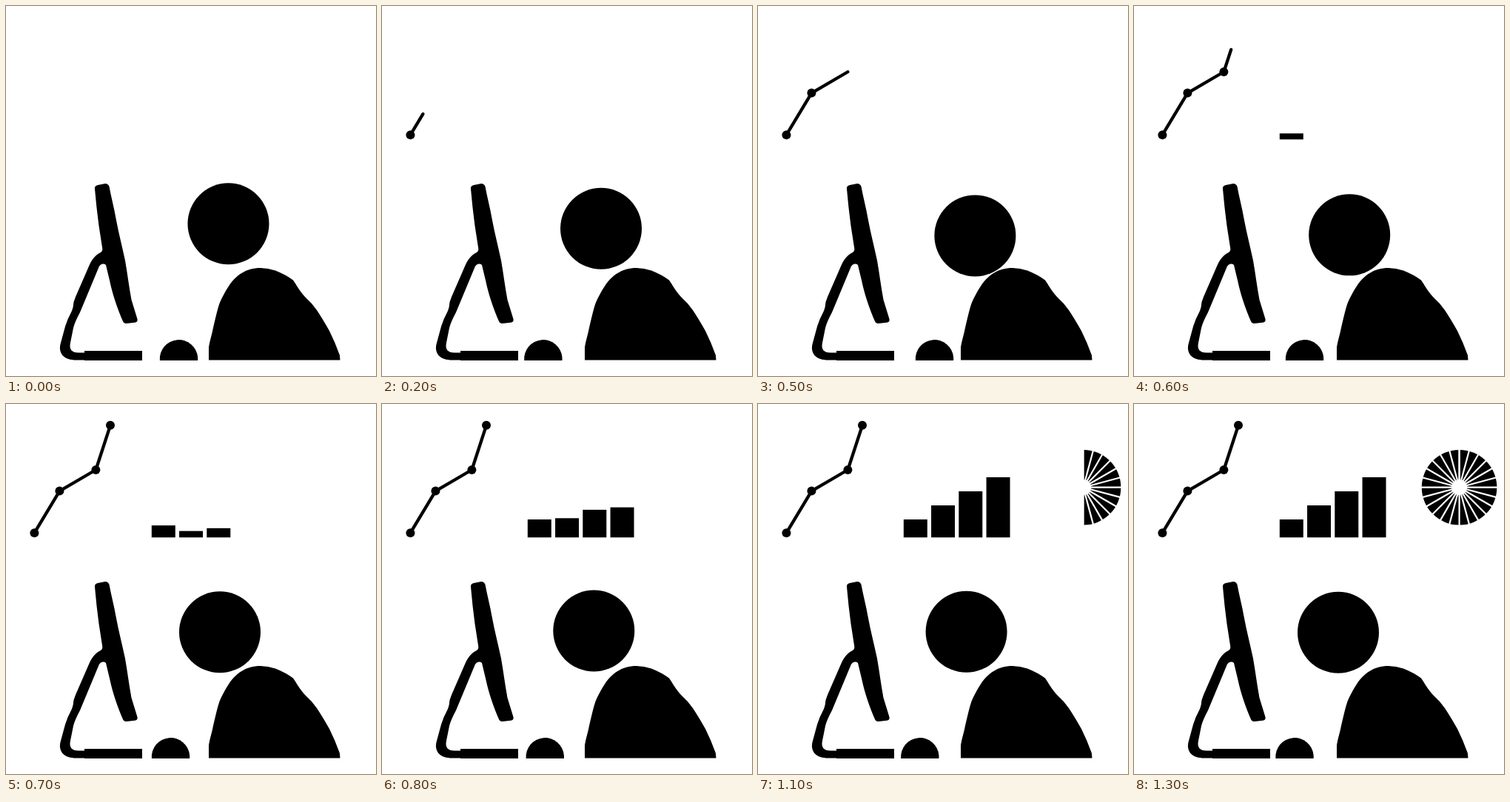
Recreate the animation shown at these times as an HTML page with a canvas. Size 500x500 px, loop 1.4 s.

```html
<!DOCTYPE html>
<html>
<head>
<meta charset="utf-8">
<style>
html, body { margin: 0; height: 100%; overflow: hidden; background: #fff; }
canvas { display: block; }
</style>
</head>
<body>
<canvas width="500" height="500"></canvas>
<script>
const ctx = document.querySelector('canvas').getContext('2d');
const STEP = 100, STEPS = 14, TAU = Math.PI * 2;

const body = new Path2D(`M274 478.5V461C276 450 278 445 279.5 437
  C283 422 285 413 287.5 405C290 397 296 386 302 377C311 364 324 354 344 354
  Q354 354 364 357.5Q378 363 388 370.5C392 376 396 384 404 393
  Q413 401 420 411Q428 423 437 439Q445 455 451 472L451.5 478.5Z`);

const monitor = new Path2D(`M120 247Q119.5 243 124 242L134 240Q138 240 139.5 244
  C142 258 146 272 148.5 287C152 306 157 325 161 344C164 361 166 378 169.5 397
  L177.5 423Q178.5 427 174 427.7L163 429Q159 429.5 157.5 425
  C151 410 144 390 140.5 373L135 350Q134 348 131 348.5Q126.5 349 125 354
  L105 402L100 414Q93 427 91 435L87 455C85 464 89 468.5 98 468.5
  H106V466H184V479H106V478.5H95C79 478.5 70.5 470 73.5 457
  L80 433Q83 423 89 412Q91 407 91.5 400L94 393L111 354
  C115 344 120 337 127 333.5Q130.5 332 130.3 328L125.5 297Q122 271 120 247Z`);

// Key poses: [step, head x, head y, hand x]
const poses = [
  [0, 300.5, 294.3, 233.5], [3, 293.8, 304, 210], [5, 293.4, 310.4, 238.5],
  [7, 289, 308.3, 222.5], [9, 283.6, 304.8, 218], [11, 281.6, 307.8, 218.8],
  [13, 276, 308.8, 217]
];
const points = [[38.4, 174.2], [72.4, 117.6], [121.4, 89], [141, 28.8]];

const mix = (a, b, k) => a + (b - a) * k;
const clamp = k => Math.max(0, Math.min(1, k));

function poseAt(n) {
  const i = Math.max(1, poses.findIndex(p => p[0] >= n));
  const a = poses[i - 1], b = poses[i];
  return a.map((v, j) => mix(v, b[j], (n - a[0]) / (b[0] - a[0])));
}

function disc(x, y, r, from = 0, to = TAU) {
  ctx.beginPath();
  ctx.arc(x, y, r, from, to);
  ctx.fill();
}

function line(x1, y1, x2, y2) {
  ctx.beginPath();
  ctx.moveTo(x1, y1);
  ctx.lineTo(x2, y2);
  ctx.stroke();
}

// Each segment takes two steps
function drawGraph(n) {
  ctx.strokeStyle = '#000';
  ctx.lineWidth = 4.3;
  ctx.lineCap = 'round';
  points.forEach(([x, y], i) => {
    if (n >= Math.min(2 * i + 2, 7)) disc(x, y, 6);
    const k = clamp((n - 1) / 2 - i), next = points[i + 1];
    if (next && k) line(x, y, mix(x, next[0], k), mix(y, next[1], k));
  });
}

function drawBars(n) {
  [5, 6.5, 6.5, 7].forEach((start, i) => {
    const end = i ? 9 : 8;
    const h = (24.3 + 19 * i) * clamp((n - start) / (end - start));
    ctx.fillRect(196.8 + i * 37.25, 180.3 - h, 32, h);
  });
}

// Six slices per step
function drawPie(n) {
  if (n < 9) return;
  const count = Math.max(1, 6 * (n - 9));
  const x = 439.6, y = 112.7, angle = i => i * TAU / 24 - TAU / 4;
  ctx.beginPath();
  ctx.moveTo(x, y);
  ctx.arc(x, y, 50.8, angle(0), angle(count));
  ctx.fill();
  ctx.strokeStyle = '#fff';
  ctx.lineWidth = 2.2;
  ctx.lineCap = 'butt';
  for (let i = 0; i <= count; i++) {
    line(x, y, x + 53 * Math.cos(angle(i)), y + 53 * Math.sin(angle(i)));
  }
  ctx.fillStyle = '#fff';
  disc(x, y, 10.5);
}

function draw() {
  const n = Math.floor(performance.now() / STEP) % STEPS;
  const [, headX, headY, handX] = poseAt(n);
  ctx.fillStyle = '#fff';
  ctx.fillRect(0, 0, 500, 500);
  ctx.fillStyle = '#000';
  ctx.fill(monitor);
  ctx.fill(body);
  disc(headX, headY, 55);
  disc(handX, 476.8, 25.7, Math.PI - .085, TAU + .085);
  drawGraph(n);
  drawBars(n);
  drawPie(n);
  requestAnimationFrame(draw);
}
draw();
</script>
</body>
</html>
```
